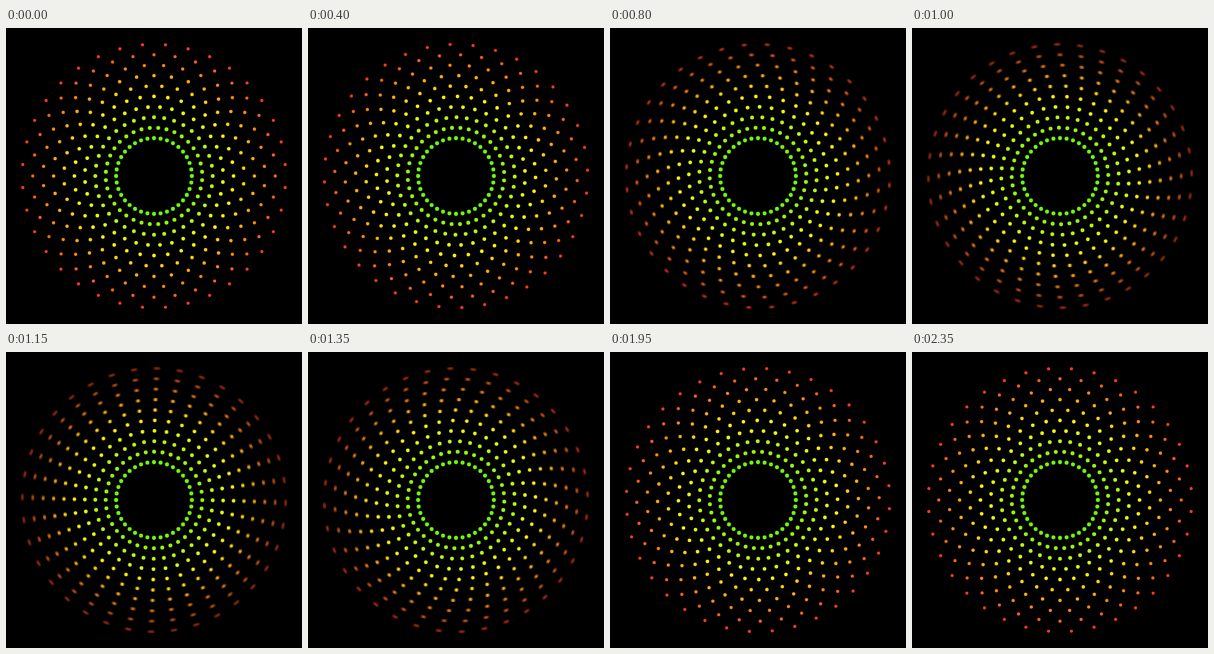
Recreate the animation shown at these times as an HTML page with a canvas. Size 500x500 px, loop 2.4 s.

```html
<!DOCTYPE html>
<html lang="en">
<head>
<meta charset="utf-8">
<title>Twisting rings</title>
<style>
  html, body { margin: 0; width: 100%; height: 100%; overflow: hidden; background: #000; }
  canvas { display: block; }
</style>
</head>
<body>
<canvas id="stage" width="500" height="500"></canvas>
<script>
const ctx = document.getElementById('stage').getContext('2d');
const LOOP = 2400, STEP = 50, SHUTTER = 30;
const RINGS = 10, DOTS = 36, GAP = 2 * Math.PI / DOTS;

const smooth = p => p * p * (3 - 2 * p);

// Twist added per ring, one dot gap over the loop
const twist = ms => GAP * smooth(smooth((ms % LOOP) / LOOP)) + GAP * Math.floor(ms / LOOP);

function drawRing(i, from, to) {
  const radius = 64 + 17.6 * i;
  const size = 3.4 - 0.09 * i;
  const offset = i % 2 * GAP / 2;
  const samples = Math.max(1, Math.ceil((to - from) * i * radius * 1.2));

  ctx.fillStyle = `hsl(${95 - 9.4 * i}, ${94 + 0.6 * i}%, ${50 + 0.4 * i}%)`;
  ctx.globalAlpha = 1 / samples;
  for (let s = 0; s < samples; s++) {
    const turn = offset + i * (from + (to - from) * (s + 0.5) / samples);
    ctx.beginPath();
    for (let d = 0; d < DOTS; d++) {
      const a = turn + d * GAP;
      const x = 250 + radius * Math.sin(a);
      const y = 250 - radius * Math.cos(a);
      ctx.moveTo(x + size, y);
      ctx.arc(x, y, size, 0, 2 * Math.PI);
    }
    ctx.fill();
  }
}

function draw(ms) {
  ctx.globalCompositeOperation = 'source-over';
  ctx.globalAlpha = 1;
  ctx.fillStyle = '#000';
  ctx.fillRect(0, 0, 500, 500);
  // Additive samples give the motion blur
  ctx.globalCompositeOperation = 'lighter';
  const open = ms + STEP;
  const from = twist(open), to = twist(open + SHUTTER);
  for (let i = 0; i < RINGS; i++) drawRing(i, from, to);
}

const start = performance.now();
let last = -1;
function tick() {
  const t = Math.max(0, performance.now() - start) % LOOP;
  const step = Math.floor(t / STEP);
  if (step !== last) draw(step * STEP);
  last = step;
  requestAnimationFrame(tick);
}
tick();
</script>
</body>
</html>
```
